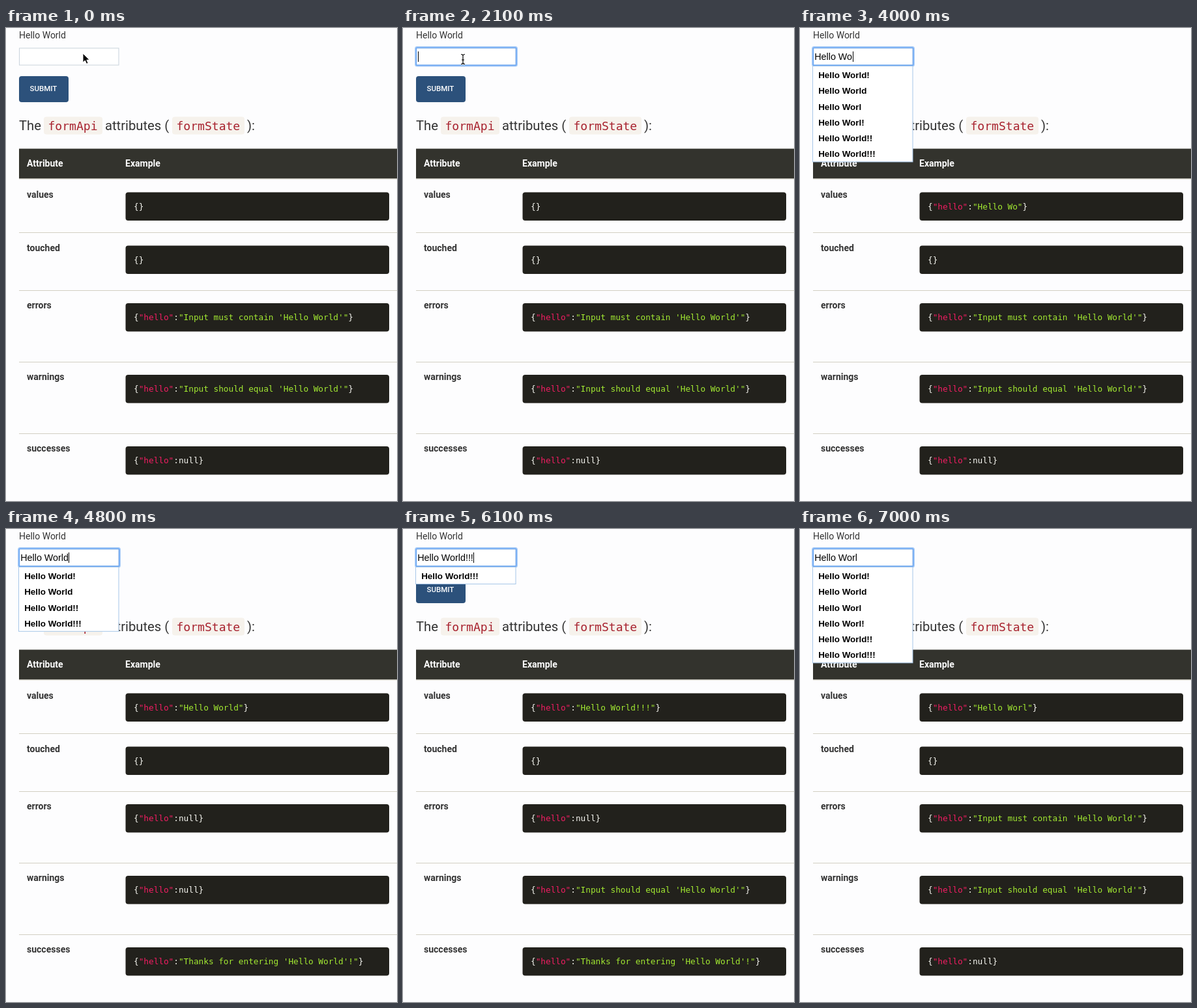
Write an HTML page that moves like this. It is 600 px wide and 727 px high and loops after 7100 ms.

```html
<!DOCTYPE html>
<html lang="en">
<head>
<meta charset="utf-8">
<title>Form validation</title>
<style>
  html, body { margin: 0; width: 100%; height: 100%; overflow: hidden; background: #fdfdfe; }
  svg { display: block; }
  text { font: 14px Roboto, sans-serif; fill: #333; white-space: pre; }
  .bold { font-weight: 700; }
  .title { font-size: 20.2px; }
  .key { font: 18.05px "DejaVu Sans Mono", monospace; fill: #a8232f; }
  .chip { fill: #f6f2ec; }
  .button { fill: #2c517b; }
  .submit { font-size: 11.5px; font-weight: 500; fill: #fff; }
  .head { fill: #33332d; }
  .white { fill: #fff; }
  .line { stroke: #d2cfc2; }
  .block { fill: #22211c; }
  .code { font: 12.72px "DejaVu Sans Mono", monospace; fill: #f8f8f2; }
  .name { fill: #f31d63; }
  .string { fill: #a3ea32; }
  .typed { font: 14.3px "Liberation Sans", Arial, sans-serif; fill: #000; }
  .option { font: bold 13.4px "Liberation Sans", Arial, sans-serif; fill: #000; }
  .field { fill: #fff; stroke: #c9d3dc; }
  .list { fill: #fff; stroke: #a6c6e8; }
</style>
</head>
<body>
<svg id="stage" width="600" height="727" viewBox="0 0 600 727">
  <text x="20" y="16">Hello World</text>
  <rect class="button" x="20" y="74" width="76" height="40" rx="4"/>
  <text class="submit" x="36.5" y="97">SUBMIT</text>

  <text class="title" x="20" y="156.5">The</text>
  <rect class="chip" x="58" y="136.5" width="90" height="27" rx="4"/>
  <text class="key" x="64.5" y="156.5">formApi</text>
  <text class="title" x="152" y="156.5">attributes (</text>
  <rect class="chip" x="255" y="136.5" width="111" height="27" rx="4"/>
  <text class="key" x="261.5" y="156.5">formState</text>
  <text class="title" x="370" y="156.5">):</text>

  <rect class="head" x="20" y="185.5" width="580" height="46"/>
  <path class="line" d="M20 232H600"/>
  <text class="bold white" x="32" y="213">Attribute</text>
  <text class="bold white" x="183" y="213">Example</text>
  <g id="rows"></g>

  <rect class="field" x="20.5" y="31" width="152.5" height="26"/>
  <g id="ring" fill="none" stroke="#6fa9f3">
    <rect x="19.5" y="29.5" width="155" height="28.5" rx="2" stroke-width="3" opacity=".55"/>
    <rect x="20.3" y="30.3" width="153.4" height="27" rx="1" stroke-width="1.8"/>
  </g>
  <g id="list"></g>
  <text id="typed" class="typed" x="22.3" y="48.7"></text>
  <rect id="caret" y="36" width="1" height="16"/>

  <path id="arrow" d="M0 0V14L3.3 11L5.6 16.2L8 15.1L5.8 10.1H10.2Z" stroke="#fff"/>
  <g id="beam" fill="none">
    <path d="M-3 -7.5Q0 -7.5 0 -5.5Q0 -7.5 3 -7.5M0 -6V6M-3 7.5Q0 7.5 0 5.5Q0 7.5 3 7.5M-2 1H2" stroke="#fff" stroke-width="3"/>
    <path d="M-3 -7.5Q0 -7.5 0 -5.5Q0 -7.5 3 -7.5M0 -6V6M-3 7.5Q0 7.5 0 5.5Q0 7.5 3 7.5M-2 1H2" stroke="#000" stroke-width="1.2"/>
  </g>
</svg>
<script>
const LOOP = 7100, STEP = 100, BLINK = 500;
const FOCUS = 800, HIDE_POINTER = 2600;
const PHRASE = 'Hello World!!!', GOAL = 'Hello World';
const OPTIONS = ['d!', 'd', '', '!', 'd!!', 'd!!!'].map(end => 'Hello Worl' + end);

// [time, characters shown]
const KEYS = [
  [FOCUS, 0], [2600, 1], [2800, 2], [2900, 3], [3100, 4], [3300, 5], [3500, 6],
  [3700, 7], [3900, 8], [4100, 9], [4300, 10], [4500, 11], [5200, 12],
  [5500, 13], [5800, 14], [6200, 13], [6300, 12], [6400, 11], [6500, 10]
];

// [label, label baseline, block top, rule below, value for the typed text]
const ROWS = [
  ['values', 260.5, 252.5, 314.5, s => s],
  ['touched', 342.5, 334.5, 403.5, () => ''],
  ['errors', 431, 423, 513.5, s => s.includes(GOAL) ? null : "Input must contain 'Hello World'"],
  ['warnings', 541, 533, 623.5, s => s === GOAL ? null : "Input should equal 'Hello World'"],
  ['successes', 651, 643, 0, s => s.includes(GOAL) ? "Thanks for entering 'Hello World'!" : null]
];

const $ = id => document.getElementById(id);
const [rows, ring, list, typed, caret, arrow, beam] =
  ['rows', 'ring', 'list', 'typed', 'caret', 'arrow', 'beam'].map($);

function add(parent, tag, attrs, text = '') {
  const el = document.createElementNS('http://www.w3.org/2000/svg', tag);
  for (const name in attrs) el.setAttribute(name, attrs[name]);
  el.textContent = text;
  return parent.appendChild(el);
}

function show(el, on) {
  el.style.display = on ? '' : 'none';
}

const codes = ROWS.map(([label, base, top, rule]) => {
  add(rows, 'text', { class: 'bold', x: 32, y: base }, label);
  add(rows, 'rect', { class: 'block', x: 183.5, y: top, width: 404.5, height: 43.5, rx: 4 });
  if (rule) add(rows, 'path', { class: 'line', d: `M20 ${rule}H600` });
  return add(rows, 'text', { class: 'code', x: 196, y: top + 26 });
});

function printCode(el, value) {
  el.textContent = '';
  const span = (text, type = '') => add(el, 'tspan', { class: type }, text);
  span('{');
  if (value !== '') {
    span('"hello"', 'name');
    span(':');
    if (value === null) span('null');
    else span(`"${value}"`, 'string');
  }
  span('}');
}

function printText(text) {
  typed.textContent = text;
  ROWS.forEach((row, i) => printCode(codes[i], row[4](text)));
  list.textContent = '';
  if (!text) return;
  const found = OPTIONS.filter(option => option.startsWith(text));
  add(list, 'rect', { class: 'list', x: 19.5, y: 58.5, width: 153.5, height: 1.8 + 24.25 * found.length });
  found.forEach((option, i) => {
    add(list, 'text', { class: 'option', x: 28.2, y: 77.2 + 24.25 * i }, option);
  });
}

function movePointer(t) {
  const p = Math.min(t / 600, 1), k = p * p * (3 - 2 * p);
  const onField = t >= 200;
  show(arrow, !onField);
  show(beam, onField && t < HIDE_POINTER);
  const place = `translate(${118 - 26 * k} ${39 + 9 * k})`;
  arrow.setAttribute('transform', place);
  beam.setAttribute('transform', place);
}

let lastText, lastTime;
function draw(now) {
  const t = Math.floor(now % LOOP / STEP) * STEP;
  if (t !== lastTime) {
    lastTime = t;
    const key = KEYS.filter(([time]) => time <= t).pop();
    const text = key ? PHRASE.slice(0, key[1]) : '';
    if (text !== lastText) printText(lastText = text);
    show(ring, key);
    show(caret, key && (t - key[0]) % (2 * BLINK) < BLINK);
    const width = text ? typed.getComputedTextLength() : 0;
    caret.setAttribute('x', Math.round(22.8 + width));
    movePointer(t);
  }
}

function tick() {
  draw(performance.now());
  requestAnimationFrame(tick);
}
tick();
</script>
</body>
</html>
```
